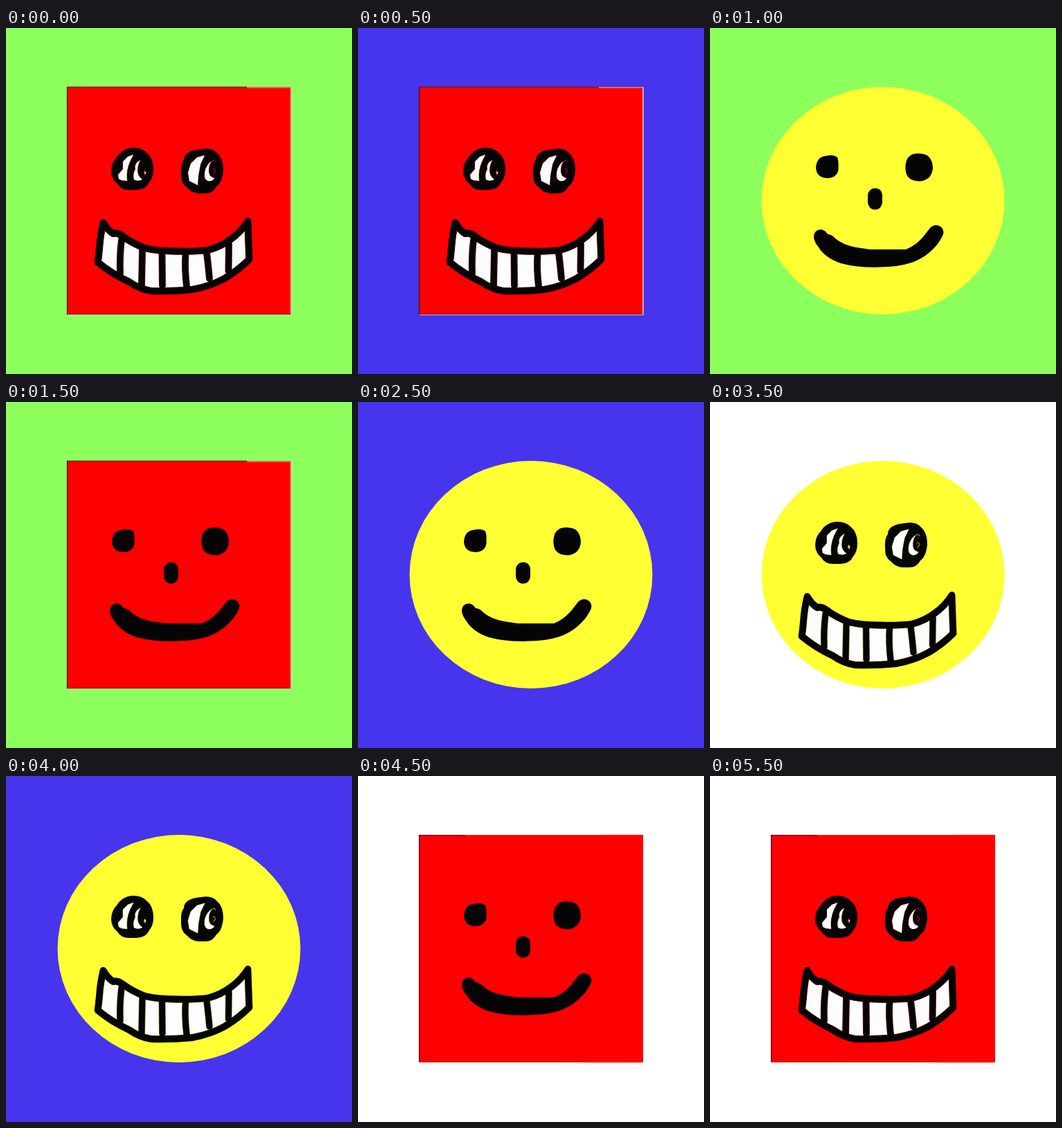
An HTML page with a canvas for the animation above (6 s loop, 500 px wide and 500 px high).

```html
<!DOCTYPE html>
<html>
<head>
<meta charset="utf-8">
<title>Faces</title>
<style>
html, body { margin: 0; width: 100%; height: 100%; overflow: hidden; background: #fff; }
canvas { display: block; }
</style>
</head>
<body>
<canvas id="stage" width="500" height="500"></canvas>
<script>
const ctx = document.getElementById('stage').getContext('2d');
const STEP = 500;
const INK = '#050505';
const PAPER = '#fdfdfd';
const BACK = { g: '#8cff5c', b: '#4635ec', w: '#ffffff' };

// Each pose: background, shape (square / round), face (teeth / plain smile)
const POSES = 'gst bst grp gsp bsp brp grt wrt brt wsp wrp wst'.split(' ');

function fill(color, d) {
  ctx.fillStyle = color;
  ctx.fill(new Path2D(d));
}

function stroke(color, width, d) {
  ctx.strokeStyle = color;
  ctx.lineWidth = width;
  ctx.stroke(new Path2D(d));
}

function square(bg) {
  ctx.fillStyle = '#ff0000';
  ctx.fillRect(88, 85, 324, 329);
  ctx.lineCap = 'butt';
  stroke('#401010', 1.2, 'M88.5 85V414');
  if (bg === 'w') {
    stroke('#501010', 1, 'M88 85.5H155');
    stroke('#d04040', 1, 'M155 85.5H348M88 413.5H326');
  } else {
    stroke('#4a2020', 1, 'M88 85.2H348M88 413.8H412');
    stroke('#d8c8c0', 1.2, 'M348 86H412.5');
    stroke('#d8c8c0', 1.6, 'M412 85.5V414.5');
    stroke('#d8c8c0', 0.9, 'M89 414.6H412.8');
  }
}

function round() {
  ctx.fillStyle = '#ffff33';
  ctx.beginPath();
  ctx.ellipse(250, 249.5, 175.5, 164.5, 0, 0, Math.PI * 2);
  ctx.fill();
}

function plain() {
  fill(INK, 'M166 185Q179 182 184 187Q186 190 185.500 205Q183 217 169 217Q154 216 153 202Q154 187 166 185Z');
  fill(INK, 'M294 182Q306 180 314 184Q322 190 322 203Q320 220 303 221.500Q291 221 286 215Q282 210 282.500 198Q284 185 294 182Z');
  fill(INK, 'M238.500 231.500Q249 232 249 243V252Q248 262 238.500 262.500Q229 262 228 252V242Q229 232 238.500 231.500Z');
  fill(INK, 'M150 302C150 290 164 287 170 298Q176 298 181 304Q191 313 211 317L231 320H283Q296 315 307 303L318 289C326 280 340 287 337 298C332 311 321 322 311 329Q299 337 288 340Q272 345 246 345.500Q215 347 189 340Q166 332 157 317Q150 308 150 302Z');
}

const MOUTH = 'M140.500 281Q147 292 155 297Q161 295 169 301Q184 312 201 318Q220 322.500 246 322.500Q276 323 293 320.500Q310 316 325 305Q340 294 349.500 279L351.500 334.500Q336 350 316 362Q296 373 270 378Q240 381 209 380Q192 377 178 367Q152 355 132.500 338.500Q134 329 135 317Q136 300 140.500 281Z';
const BARS = 'M167 306Q164 330 165 354M197 321L196 372M225.500 324L226 372M259.500 326Q258 348 261 373M290 325Q292 340 294 362M322 312L321.500 351';
const BALLS = [
  'M184 173Q196 173 203 180Q213 188 213 204Q213 216 207 223Q202 234 188 234H178Q166 234 161 225Q152 218 152 206Q153 193 160 187Q168 173.500 184 173Z',
  'M282 175Q298 172 305 181Q314 188 314 206Q312 224 304 229Q299 239 288 239H277Q268 238 261 230Q253 225 253 213Q252 196 257 191Q257 177 282 175Z'
];
const WHITES = [
  'M184 183L176 186L169 193L169 204L162 212L163 218L167 220L175 221Q173 207 179 193Z',
  'M194 191Q185 195 187 204Q183 211 185 219Q190 222 197 219Q190 214 190 206Q190 198 194 191Z',
  'M287 184L276 187L267 196L263 209L265 221L277 227L278 213L281 197Z',
  'M295 194Q286 202 287 215Q289 222 295 221Q300 220 301 217Q292 215 293 204Q293 198 297 193Z'
];

function teeth(fringe) {
  fill(PAPER, MOUTH);
  ctx.save();
  ctx.clip(new Path2D(MOUTH));
  stroke(fringe, 10, BARS);
  stroke(fringe, 10.5, MOUTH);
  ctx.restore();
  stroke(INK, 8.8, BARS);
  stroke(INK, 9.8, MOUTH);

  for (const d of BALLS) fill(INK, d);
  for (const d of WHITES) {
    stroke(fringe, 1, d);
    fill(PAPER, d);
  }
  fill(fringe, 'M200 206Q204 208 201 213Q197 211 200 206Z');
  fill(PAPER, 'M200 207L202.500 209L201 212Z');
  stroke(fringe, 1.2, 'M297 193Q300 190 303 193M299 204Q302 201 302.500 207L300 210');
}

function draw(now) {
  const [bg, shape, face] = POSES[Math.floor(now / STEP) % POSES.length];
  ctx.fillStyle = BACK[bg];
  ctx.fillRect(0, 0, 500, 500);
  if (shape === 's') square(bg);
  else round();
  ctx.lineCap = ctx.lineJoin = 'round';
  if (face === 't') teeth(shape === 's' ? '#a00808' : '#8c8c18');
  else plain();
}

let start;
function tick(now) {
  start ??= now;
  draw(now - start);
  requestAnimationFrame(tick);
}
draw(0);
requestAnimationFrame(tick);
</script>
</body>
</html>
```
